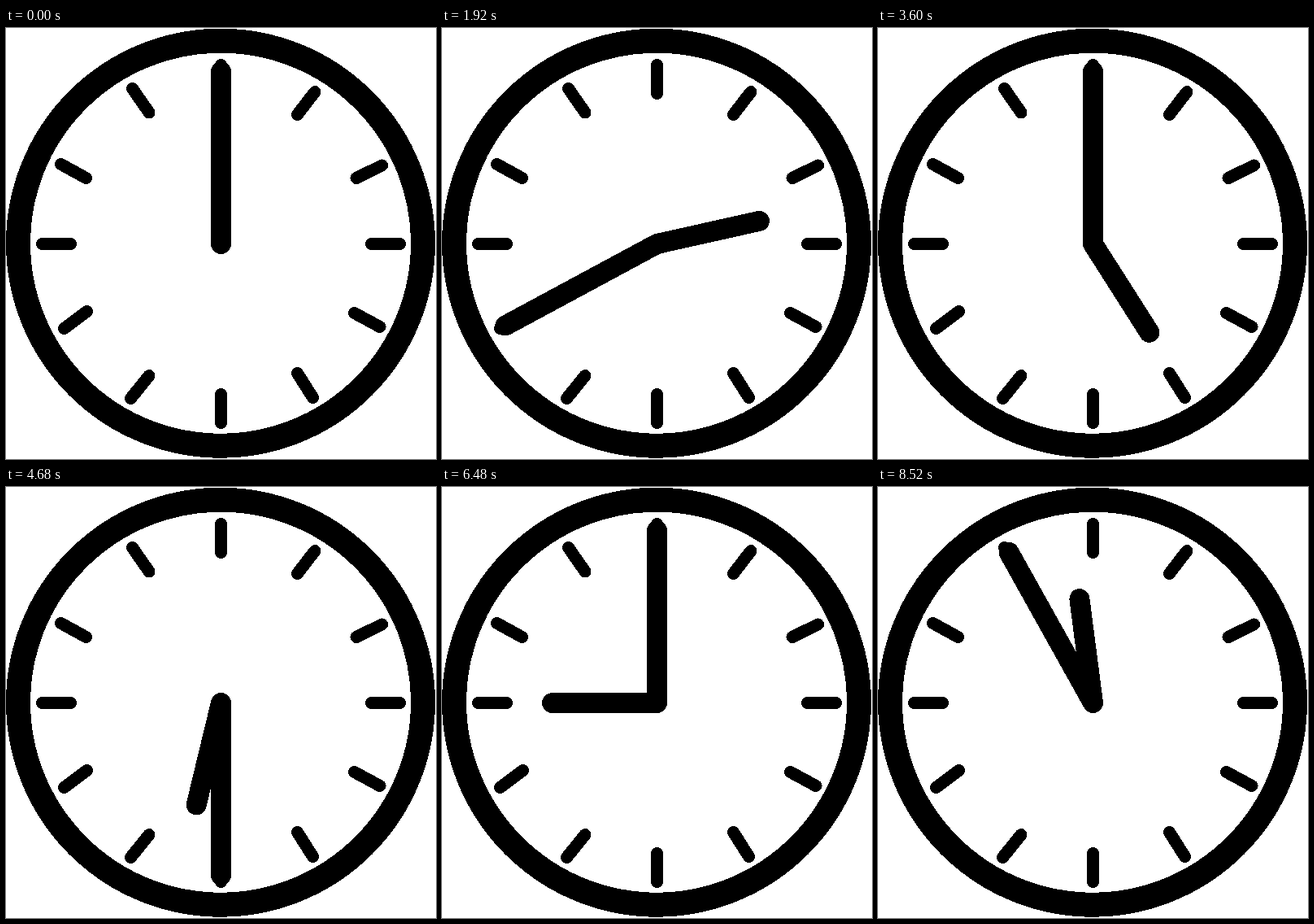
Animation of 529x530 px, one loop 8580 ms. Source, as an HTML page:

```html
<!DOCTYPE html>
<html>
<head>
<meta charset="utf-8">
<style>
html, body { margin: 0; width: 100%; height: 100%; overflow: hidden; background: #fff; }
svg { display: block; fill: none; stroke: #000; stroke-linecap: round; shape-rendering: crispEdges; }
</style>
</head>
<body>
<svg width="529" height="530" viewBox="0 0 529 530">
  <circle cx="264" cy="264.7" r="249" stroke-width="30"/>
  <path stroke-width="15" d="M264.5 45.5V80.5M380 78.5L358.5 106.5M462.5 169L431 184.5M484.5 265.5H449.5
    M460 367.5L428.5 350.5M377.5 454.5L358.5 424.5M264.5 485.5V450.5M153.5 455.5L176 427.5
    M71.5 369.5L99.5 348.5M44.5 265.5H79.5M67.5 167.5L98.5 184.5M155.5 74.5L176 104"/>
  <g stroke-width="25">
    <path id="hour" d="M264.5 265.5V136.5"/>
    <path id="minute" d="M264.5 265.5V53.5"/>
  </g>
</svg>
<script>
const STEP = 60, COUNT = 143;
const hour = document.getElementById('hour');
const minute = document.getElementById('minute');

// The dial is slightly uneven: the minute hand points at each mark.
const marks = [0, 31.5, 64, 90, 117.5, 149, 180, 210.3, 241.7, 270, 296.4, 330.8];

// Hour hand: [step, degrees], linear in between.
const hourKeys = [[0, 0], [32, 77.4], [60, 147.5], [78, 193.6], [108, 270], [127, 313.3], [142, 352.6]];

function hourAngle(n) {
  const i = Math.max(1, hourKeys.findIndex(k => k[0] >= n));
  const [a, from] = hourKeys[i - 1], [b, to] = hourKeys[i];
  return from + (to - from) * (n - a) / (b - a);
}

function turn(hand, angle) {
  hand.setAttribute('transform', `rotate(${angle} 264.5 265.5)`);
}

const start = performance.now();
function draw() {
  const n = Math.floor((performance.now() - start) / STEP) % COUNT;
  // The minute hand skips one mark at ten o'clock.
  turn(minute, marks[(n < 120 ? n : n + 1) % 12]);
  turn(hour, hourAngle(n));
  requestAnimationFrame(draw);
}
draw();
</script>
</body>
</html>
```
